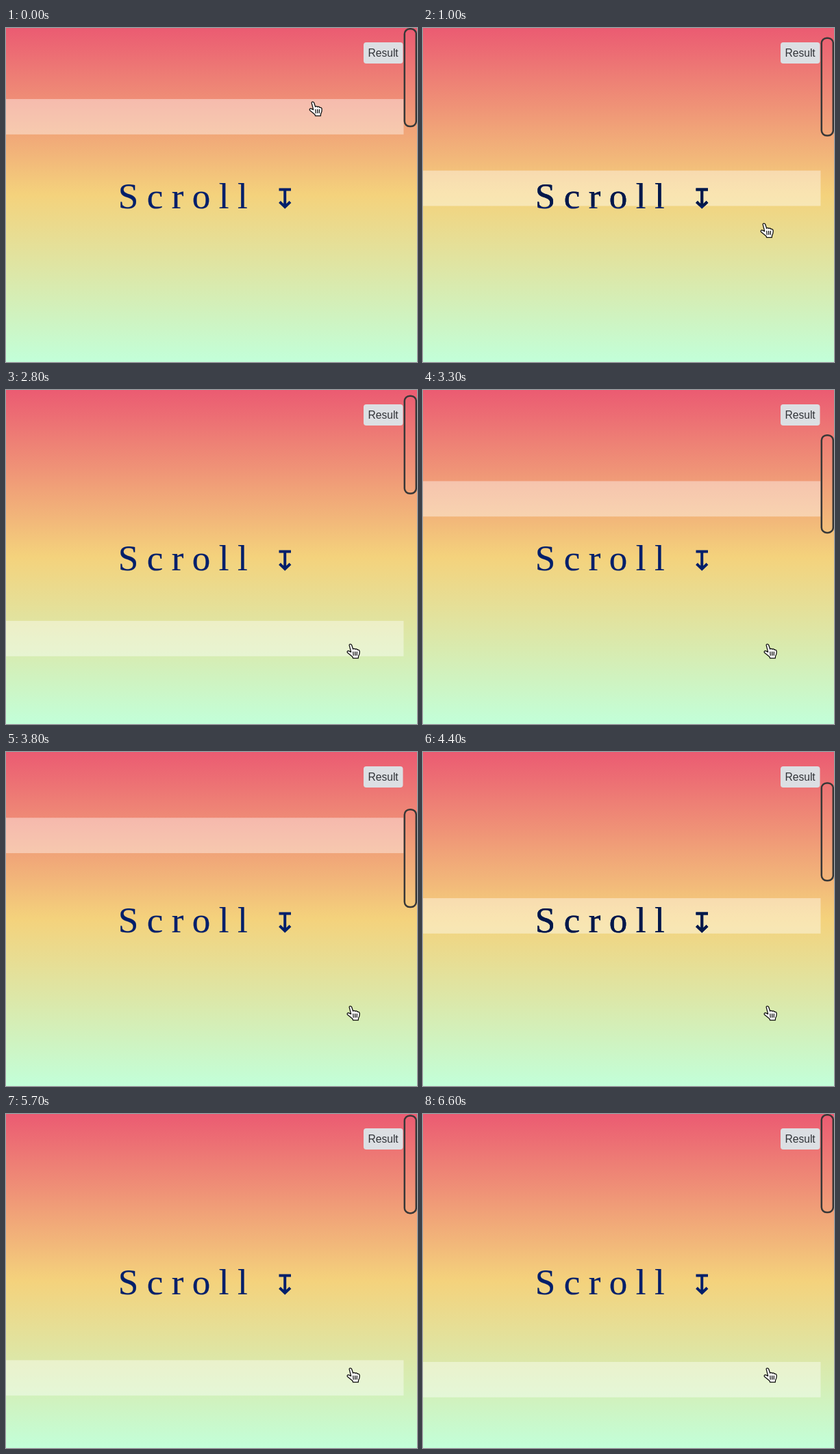
Animation of 600x489 px, one loop 6.7 s. Source, as an HTML page:

```html
<!DOCTYPE html>
<html lang="en">
<head>
<meta charset="utf-8">
<title>Scroll</title>
<style>
  html, body { margin: 0; width: 100%; height: 100%; overflow: hidden; }
  svg { display: block; width: 100%; height: 100%; }
  .title { font: 53px "Liberation Serif", "Times New Roman", serif; letter-spacing: 12.5px; }
  .button { font: 15.6px "Liberation Sans", Arial, sans-serif; fill: #303338; }
</style>
</head>
<body>
<svg viewBox="0 0 600 489">
  <defs>
    <linearGradient id="sky" x2="0" y2="1">
      <stop stop-color="#eb5b72"/>
      <stop offset=".5" stop-color="#f4d27c"/>
      <stop offset="1" stop-color="#c2ffd9"/>
    </linearGradient>
    <clipPath id="rowClip"><rect id="rowWindow" width="580.5" height="51.8"/></clipPath>
    <g id="heading">
      <text class="title" x="163.7" y="264" stroke-width=".2">Scroll</text>
      <path d="M398.5 236.5H416M407.2 236.5V261M399.5 254.5L407.2 262L415 254.5" fill="none" stroke-width="4"/>
    </g>
  </defs>
  <rect width="600" height="489" fill="url(#sky)"/>
  <rect id="row" width="580.5" height="51.8" fill="#fff" fill-opacity=".4"/>
  <use href="#heading" fill="#001f6b" stroke="#001f6b"/>
  <g clip-path="url(#rowClip)"><use href="#heading" fill="#02184a" stroke="#02184a"/></g>
  <rect x="522" y="21" width="57.5" height="31" rx="4" fill="#dcdfe3"/>
  <text class="button" x="528.5" y="42">Result</text>
  <rect id="thumb" x="581.8" width="17" height="142.8" rx="7.5" fill="none" stroke="#383838" stroke-width="2.5"/>
  <g id="cursor" stroke="#111" stroke-width="1.3" stroke-linejoin="round" stroke-linecap="round">
    <path fill="#fff" d="M4.2 3.2C3.8 .9 7 .6 7.8 3L9.6 8.6C10.5 7.5 12.4 7.8 12.8 9C13.6 8.1 15.4 8.4 15.9 9.8C17 9.2 18.9 10 19.1 11.6C19.6 14.5 18.7 17 17.5 19.2L17.3 21.9L9.6 22L9 20C6.8 18 4.6 16.2 2 14.2C.2 12.8 1.5 10.7 3.6 11.4L6.7 13Z"/>
    <path fill="none" d="M9.8 12.8L10.2 17.8M12.6 12.6L12.8 17.7M15.4 12.6L15.3 17.6"/>
  </g>
</svg>
<script>
const LOOP = 6700, STEP = 100;
const ROW_TOP = 104, ROW_HEIGHT = 51.8;
const SCROLL_RATIO = 3.372, THUMB_LAG = 20, SETTLE = 250;

// Each flick pulls the page down to `top`, then lets it glide back to `rest`
const flicks = [
  { start: 700, peak: 1532, top: 171, rest: 25 },
  { start: 2800, peak: 3628, top: 338, rest: 149 },
  { start: 4400, peak: 5150, top: 325, rest: 0 }
];

function ease(t, start, end) {
  const u = Math.min(1, Math.max(0, (t - start) / (end - start)));
  return u * u * (3 - 2 * u);
}

function scrollAt(t) {
  let y = 0;
  for (const { start, peak, top, rest } of flicks) {
    if (t < start) break;
    y = t < peak
      ? y + (top - y) * ease(t, start, peak)
      : rest + (top - rest) * Math.exp(-(((t - peak) / SETTLE) ** 2));
  }
  return y;
}

function cursorAt(t) {
  const first = ease(t, 0, 600), second = ease(t, 2100, 2700);
  return { x: 442 + 50 * first + 5 * second, y: 106.7 + 178 * first + 86 * second };
}

// The highlighted row stays the same while the page scrolls
function hoveredRow(t) {
  const h = t < 2200 ? Math.min(t, 700) : Math.min(t, 2800);
  return Math.floor((cursorAt(h).y + 2 + scrollAt(h) - ROW_TOP) / ROW_HEIGHT);
}

const byId = id => document.getElementById(id);
const row = byId('row'), rowWindow = byId('rowWindow');
const thumb = byId('thumb'), cursor = byId('cursor');

function render(t) {
  const y = ROW_TOP + hoveredRow(t) * ROW_HEIGHT - scrollAt(t);
  row.setAttribute('y', y);
  rowWindow.setAttribute('y', y);
  thumb.setAttribute('y', 1.3 + scrollAt(t - THUMB_LAG) / SCROLL_RATIO);
  const hand = cursorAt(t);
  cursor.setAttribute('transform', `translate(${hand.x} ${hand.y})`);
}

const start = performance.now();
function frame() {
  const t = (performance.now() - start) % LOOP;
  render(Math.floor(t / STEP) * STEP);
  requestAnimationFrame(frame);
}
frame();
</script>
</body>
</html>
```
